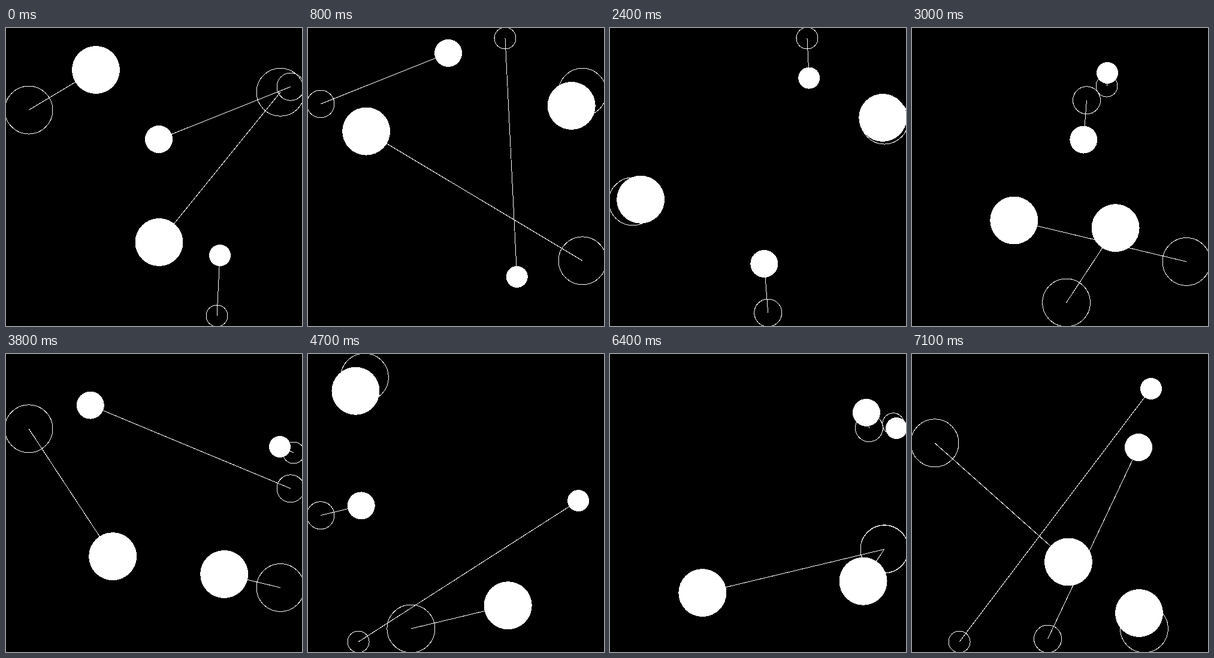
Write an HTML page that moves like this. It is 494 px wide and 498 px high and loops after 7200 ms.

```html
<!DOCTYPE html>
<html lang="en">
<head>
<meta charset="utf-8">
<title>Bouncing balls with predicted impacts</title>
<style>
  html, body { margin: 0; width: 100%; height: 100%; overflow: hidden; background: #000; }
  svg { display: block; width: 494px; height: 498px; }
  line, .ghost { stroke: #fff; fill: none; }
  .ball { fill: #fff; }
</style>
</head>
<body>
<svg viewBox="0 0 494 498" shape-rendering="crispEdges"></svg>
<script>
const STEP = 100, STEPS = 72;
const WALLS = [[-2, 498], [-1, 499]];

// Key points [step, x, y] where two balls collide. Between them a ball runs
// straight in an unfolded plane, and fold() turns that into wall bounces.
const balls = [
  { r: 40, path: [[0, 150, 70], [15.05, -172, 263], [15.96, -170, 240], [69.35, 1124, 550], [71, 1101, 570.5]] },
  { r: 40, path: [[0, 255.5, 358], [15.96, 623, -97], [66.4, -395, 1452], [69.35, -476, 1371], [71, -461, 1325]] },
  { r: 23, path: [[0, 255, 186], [15.05, 1122, -160], [31.06, 1199.5, 831], [42.2, 573, 1092],
    [52.99, 1221, 1248], [66.4, 1361, 2059], [69.25, 1436, 1879], [71, 1480, 1972]] },
  { r: 18, path: [[0, 357, 380], [31.06, 325, 1025], [42.2, 537, 1118], [52.99, 344, 1242],
    [64.41, 487, 1045], [69.25, 525, 951.6], [71, 561, 904]] }
];

const range = (axis, r) => [WALLS[axis][0] + r, WALLS[axis][1] - r];

function fold(value, speed, [lo, hi]) {
  const span = hi - lo, lap = 2 * span;
  const m = ((value - lo) % lap + lap) % lap;
  return m < span ? [lo + m, speed] : [lo + lap - m, -speed];
}

function stateAt({ r, path }, t) {
  let i = 0;
  while (i < path.length - 2 && path[i + 1][0] <= t) i++;
  const a = path[i], b = path[i + 1];
  const axes = [0, 1].map(axis => {
    const speed = (b[axis + 1] - a[axis + 1]) / (b[0] - a[0]);
    return fold(a[axis + 1] + speed * (t - a[0]), speed, range(axis, r));
  });
  return { r, p: axes.map(s => s[0]), v: axes.map(s => s[1]) };
}

function wallTime({ r, p, v }) {
  return Math.min(...[0, 1].map(axis => {
    const [lo, hi] = range(axis, r);
    return ((v[axis] > 0 ? hi : lo) - p[axis]) / v[axis];
  }));
}

function hitTime(a, b) {
  const [dx, dy] = [b.p[0] - a.p[0], b.p[1] - a.p[1]];
  const [vx, vy] = [b.v[0] - a.v[0], b.v[1] - a.v[1]];
  const speed2 = vx * vx + vy * vy;
  const closing = dx * vx + dy * vy;
  const gap = dx * dx + dy * dy - (a.r + b.r) ** 2;
  const disc = closing * closing - speed2 * gap;
  if (closing >= 0 || gap <= 0 || disc < 0) return Infinity;
  return (-closing - Math.sqrt(disc)) / speed2;
}

const svg = document.querySelector("svg");
function add(tag, className) {
  const el = document.createElementNS("http://www.w3.org/2000/svg", tag);
  el.setAttribute("class", className);
  return svg.appendChild(el);
}
function set(el, attrs) {
  for (const name in attrs) el.setAttribute(name, attrs[name]);
}

const lines = balls.map(() => add("line", "aim"));
const ghosts = balls.map(() => add("circle", "ghost"));
const discs = balls.map(() => add("circle", "ball"));

function draw(t) {
  const states = balls.map(ball => stateAt(ball, t));
  const walls = states.map(wallTime);
  states.forEach((ball, i) => {
    // Aim at the next impact foreseen from the present velocities.
    let wait = walls[i];
    states.forEach((other, j) => {
      const hit = i === j ? Infinity : hitTime(ball, other);
      if (hit <= walls[j]) wait = Math.min(wait, hit);
    });
    const { r, p: [x, y], v } = ball;
    const tx = x + v[0] * wait, ty = y + v[1] * wait;
    set(lines[i], { x1: x, y1: y, x2: tx, y2: ty });
    set(ghosts[i], { cx: tx, cy: ty, r });
    set(discs[i], { cx: x, cy: y, r });
  });
}

const start = performance.now();
function tick() {
  draw(Math.floor((performance.now() - start) / STEP) % STEPS);
  requestAnimationFrame(tick);
}
tick();
</script>
</body>
</html>
```
